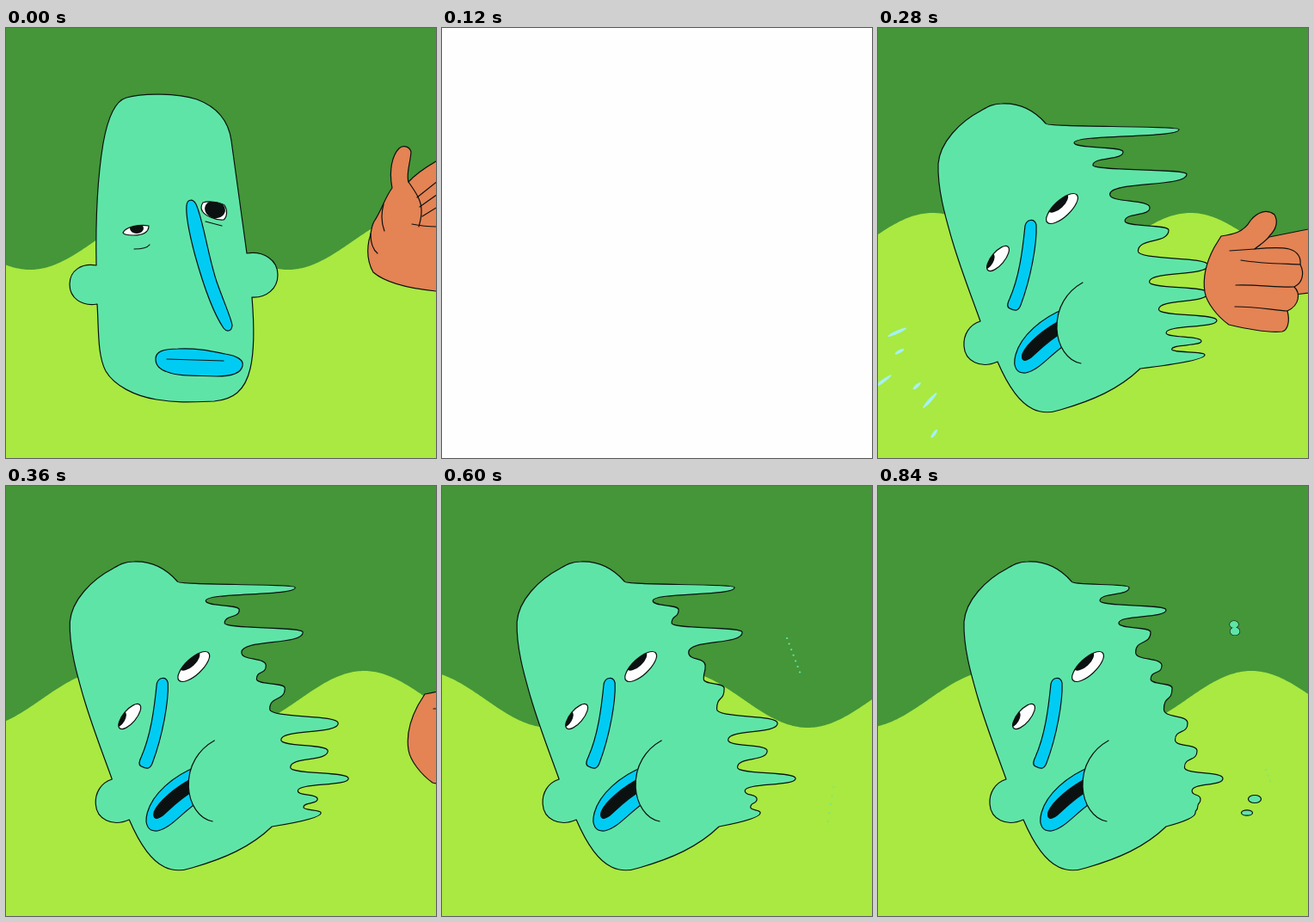
These frames come from a looping animation (500 by 500 pixels, 0.92 s). An HTML page with a canvas:

```html
<!DOCTYPE html>
<html lang="en">
<head>
<meta charset="utf-8">
<title>Slap</title>
<style>
html, body { margin: 0; width: 100%; height: 100%; overflow: hidden; background: #a9e941; }
canvas { display: block; width: 500px; height: 500px; }
</style>
</head>
<body>
<canvas id="stage" width="500" height="500"></canvas>
<script>
const ctx = document.getElementById('stage').getContext('2d');
const SKIN = '#5fe4a7', BLUE = '#00ccf3', HAND = '#e48354', INK = '#0b1110',
  WHITE = '#fefefe', SPIT = '#a4f1f4', FOREST = '#449638', GRASS = '#a9e941';
const LOOP = 920, STEP = 40, LAST = 840;
const FLASH = 120, RECOIL = 200, SETTLED = 280, FLAP = 440;

const mix = (a, b, k) => a + (b - a) * k;
const rad = deg => deg * Math.PI / 180;

function shape(path, fill, line = INK, width = 1.2) {
  const p = new Path2D(path);
  if (fill) { ctx.fillStyle = fill; ctx.fill(p); }
  if (line) { ctx.strokeStyle = line; ctx.lineWidth = width; ctx.stroke(p); }
}

const oval = (x, y, rx, ry, deg = 0) => {
  const dx = rx * Math.cos(rad(deg)), dy = rx * Math.sin(rad(deg));
  const arc = `A${rx} ${ry} ${deg} 0 1 `;
  return `M${x - dx} ${y - dy}${arc}${x + dx} ${y + dy}${arc}${x - dx} ${y - dy}Z`;
};

function at(x, y, draw) {
  ctx.save();
  ctx.translate(x, y);
  draw();
  ctx.restore();
}

function eye(white, pupil) {
  shape(white, WHITE, null);
  ctx.save();
  ctx.clip(new Path2D(white));
  shape(pupil, INK, null);
  ctx.restore();
  shape(white);
}

function hills(t) {
  const crest = 178 + 0.662 * t;
  ctx.fillStyle = FOREST;
  ctx.fillRect(0, 0, 500, 500);
  ctx.beginPath();
  ctx.moveTo(0, 500);
  for (let x = 0; x <= 500; x += 2)
    ctx.lineTo(x, 248 - 33 * Math.cos((x - crest) * Math.PI / 150));
  ctx.lineTo(500, 500);
  ctx.fillStyle = GRASS;
  ctx.fill();
}

function calmHead() {
  shape('M105 276C104 220 107 170 113 134C118 106 126 85 140 81C160 75 200 76 222 83C246 92 259 109 262 131L280 262C300 259 316 270 316 287C316 303 303 314 286 313C289 350 289 375 284 396C278 422 264 432 242 434C215 435 200 436 175 432C150 428 126 416 116 399C106 380 108 350 106 321C88 324 74 314 74 298C74 282 88 273 105 276Z', SKIN);
  eye('M136 238C139 231 155 228 166 230C166 238 158 241 148 241C141 241 137 240 136 238Z', oval(152, 233, 8, 6));
  shape('M149 257C157 257 164 256 167 252');
  eye('M229 203C235 201 248 202 254 206C258 212 257 220 253 223C244 224 232 218 229 214C226 210 227 206 229 203Z', oval(243, 211, 12, 10, 15));
  shape('M232 225L251 230');
  shape('M210 206C211 199 217 198 221 205C229 222 235 265 245 295C253 318 263 340 263 346C262 354 256 353 253 349C240 330 227 290 220 265C212 235 209 215 210 206Z', BLUE);
  shape('M174 385C174 376 183 373 200 373C225 372 240 376 255 379C268 381 277 386 275 393C273 402 262 405 245 405C220 404 200 405 188 400C178 397 174 391 174 385Z', BLUE);
  shape('M187 385L253 387');
}

function openHand() {
  shape('M548 122L500 155C488 162 476 170 468 179C465 170 470 158 471 144C469 137 461 136 457 140C449 148 445 166 449 186C440 198 437 212 428 225C424 232 425 239 422 247C419 262 422 275 427 284C441 296 470 303 500 306L720 330V240L545 225C572 200 572 118 548 122Z', HAND);
  shape('M468 179C474 188 484 200 483 214C483 221 481 227 480 231M472 228C482 230 492 231 500 231M439 205C436 216 437 228 440 236M424 239C424 250 427 258 432 262');
  for (let i = 0; i < 3; i++) shape(`M${478 + 3 * i} ${197 + 11 * i}l34 ${-27 + 3 * i}`);
}

function fist() {
  shape('M366 253C364 241 354 231 346 236C337 245 333 262 322 272C311 281 306 297 306 310C309 325 313 342 327 354C340 362 355 370 368 371C378 370 382 362 376 354C384 352 383 340 378 335C386 330 389 322 388 319L720 262V190L500 232L470 240Z', HAND);
  shape('M366 253C366 268 354 277 345 276L328 288M345 276C356 271 369 277 370 290C370 297 367 300 362 301M334 306C345 303 355 302 362 301C375 300 383 310 382 320C380 328 372 330 366 329M344 328C355 328 366 327 378 335M350 350C360 350 370 349 376 354M387 303C390 314 388 327 380 335');
}

function backHand() {
  shape('M485 310L438 257L455 243L720 190V280Z', HAND);
  shape('M399 242C412 240 425 238 433 224C441 214 452 210 461 217C466 226 462 235 455 242C451 248 444 252 438 257C458 255 470 255 478 257C489 260 492 268 491 275C496 285 494 296 484 301C491 308 491 322 476 329C479 340 477 351 470 353C452 355 425 349 408 345C394 335 382 319 380 307C377 288 383 270 391 255Z', HAND);
  shape('M409 259L438 257M422 270C445 274 470 274 491 275M416 299C440 298 465 302 484 301M415 324C440 324 460 328 476 329');
}

// Strands torn out of the cheek: height, tip when drawn in, tip when flung out
const STRANDS = [[118, 262, 323], [144, 305, 258], [170, 287, 332], [209, 300, 289], [235, 312, 311],
  [276, 330, 373], [308, 341, 361], [340, 371, 394], [364, 345, 349], [380, 339, 353]];

const phase = t => (t - FLAP) / STEP % 5;

// Rounded tips and hollows; reach flings the strands, pull stretches them, grow lifts them off the cheek
function torn(reach, pull, grow) {
  let x = 195, y = 111, d = '';
  const to = (nx, ny) => {
    nx = mix(195 + (ny - 111) * 0.55, nx, grow);
    const bend = (ny - y) * 0.66;
    d += `C${x} ${y + bend} ${nx} ${ny - bend} ${nx} ${ny}`;
    x = nx; y = ny;
  };
  STRANDS.forEach(([tipY, near, far], i) => {
    const tip = mix(near, far, reach);
    to(pull ? Math.max(tip, Math.min(tip + 27 * pull, 384)) : tip, tipY);
    const next = STRANDS[i + 1];
    if (next) to(228 + 23 * i - 1.1 * i * i, mix(tipY, next[0], 0.6));
  });
  return d + `Q${x} ${y + 7} 305 396`;
}

function cheekSide(t) {
  if (t <= RECOIL) return 'C222 142 250 195 274 232C297 268 318 330 317 366C317 378 313 388 305 396';
  if (t < FLAP) return torn(1, Math.max(0, 1 - Math.abs(t - SETTLED) / 120), Math.min(1, (t - RECOIL) / 80));
  return torn(phase(t) / 4, 0, 1);
}

function hitHead(t) {
  shape('M195 111' + cheekSide(t) + 'C280 420 250 433 212 444C200 448 190 448 180 443C161 434 148 409 139 388C119 397 101 387 100 370C99 357 106 345 119 341C109 313 96 280 86 246C80 225 69 190 70 158C72 133 95 109 120 96C127 92 133 88 144 88C165 87 181 95 195 111Z', SKIN);
  eye(oval(214, 210, 23.5, 9.5, -43), oval(209, 203, 15, 7.5, -43));
  eye(oval(139.5, 268, 18, 7.5, -50), oval(129, 271, 10, 5, -60));
  shape('M171 230C173 222 182 221 184 229C185 250 178 290 166 322C163 330 159 329 153 326C149 324 151 319 153 315C164 290 168 260 171 230Z', BLUE);
  shape('M218 326C190 337 166 358 160 380C156 395 162 402 172 401C187 398 198 382 218 368Z', BLUE);
  shape('M216 338C192 350 172 368 168 379C166 388 171 388 178 383C190 372 200 362 216 353Z', INK);
  shape('M238 296C220 306 207 325 208 350C209 370 220 387 236 390', SKIN);
}

// Dotted trail of n specks
function specks(n, x, y, dx, dy, alpha) {
  ctx.globalAlpha = alpha;
  for (let i = 0; i < n; i++) shape(oval(x + dx * i, y + dy * i, 1.2, 1), SKIN, null);
  ctx.globalAlpha = 1;
}

// Beads fly off the tips, shrink, and end as specks
function beads(t) {
  const p = phase(t), size = 1 - p * 0.22;
  if (p === 4) {
    specks(7, 384, 177, 2.5, 6.6, 1);
    specks(5, 438, 350, -1.6, 10, 0.6);
    return;
  }
  const twin = oval(384 + p * 2, 161 + p * 7, 5 * size, 4 * size) + oval(385 + p * 2, 169 + p * 7, 5.5 * size, 4.5 * size);
  shape(twin);
  shape(twin, SKIN, null);
  shape(oval(408 + p * 7, 364 - p * 2, 7.5 * size, 4.5 * size), SKIN);
  shape(oval(399 + p * 8, 380 + p, 6.5 * size, 3.2 * size), SKIN);
  if (!p) specks(3, 421, 330, 2.5, 6.5, 0.5);
}

// Zigzag of n corners: every second one juts out by (jx, jy)
function zigzag(n, x, y, dx, dy, jx, jy) {
  let d = '';
  for (let i = 0; i < n; i++)
    d += `${i ? 'L' : 'M'}${x + dx * i + jx * (i % 2)} ${y + dy * i + jy * (i % 2)}`;
  shape(d, null, SPIT, 2.4);
}

function spit(t) {
  if (t === RECOIL) {
    zigzag(6, 98, 338, 4, -1, 30, -10);
    zigzag(5, 114, 332, 5, 3, 5, 18);
    zigzag(5, 115, 374, 10, 1, 30, -9);
  } else if (t > RECOIL && t <= 320) {
    const k = (t - RECOIL) / 80;
    for (let i = 0; i < 7; i++) {
      const a = rad(190 - 12 * i), far = k * (118 + 20 * Math.cos(2.1 * i));
      shape(oval(130 + far * Math.cos(a), 350 + far * Math.sin(a), i % 2 ? 12 : 6, 1.9, -18 - 6 * i), SPIT, null);
    }
  }
}

function draw(t) {
  hills(t);
  if (t < FLASH) {
    calmHead();
    at(-t * 1.6, 0, openHand);
  } else if (t === FLASH) {
    ctx.fillStyle = WHITE;
    ctx.fillRect(0, 0, 500, 500);
  } else {
    const knock = Math.max(0, (SETTLED - t) / 80);
    const drift = Math.max(0, (t - SETTLED) * 0.0536);
    at(178 + drift - 24 * knock, 224 + 7 * knock, () => {
      ctx.rotate(rad(-5 * knock));
      ctx.translate(-178, -224);
      hitHead(t);
      if (t >= FLAP) beads(t);
    });
    spit(t);
    if (t <= RECOIL) at((t - RECOIL) * 0.8, 0, fist);
    else if (t < FLAP) at((t - SETTLED) * 1.1, 0, backHand);
  }
}

ctx.lineJoin = ctx.lineCap = 'round';
let start, shown = -1;
function tick(now) {
  start ??= now;
  const t = Math.min(LAST, Math.floor((now - start) % LOOP / STEP) * STEP);
  if (t !== shown) draw(shown = t);
  requestAnimationFrame(tick);
}
draw(0);
requestAnimationFrame(tick);
</script>
</body>
</html>
```
